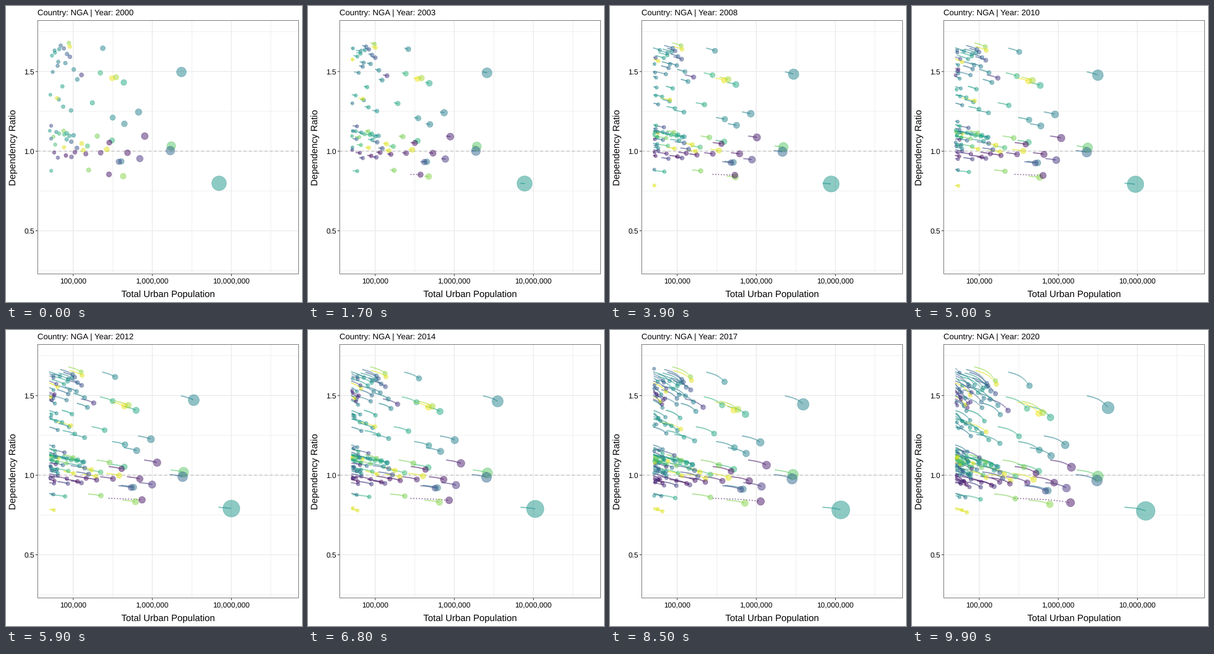
Write a matplotlib script that moves like this. It is 480x480 px and loops after 10000 ms.

```python
import numpy as np
import matplotlib.pyplot as plt
from matplotlib.animation import FuncAnimation

FRAMES, YEARS = 100, 20
SIZE, DPI = 480, 80
PT = 72 / DPI                       # points per pixel
LEFT, RIGHT, TOP, BOTTOM = 51.5, 474.5, 23.5, 434.5
X_100K, DECADE = 109, 128.25        # log axis: position of 100,000, pixels per decade
Y_ONE, UNIT = 235.4, 258.2          # ratio axis: position of 1.0, pixels per unit
X_ENTRY = 70.5                      # 50,000 inhabitants
GROWTH = 33.5                       # usual shift of a city over the whole period

plt.rcParams["font.family"] = ["Liberation Sans", "DejaVu Sans"]
plt.rcParams["text.hinting"] = "none"

# The cities that stand apart: x, y, shade
LEADERS = [
    (345.5, 287.5, .53), (284.5, 107, .45), (215, 172, .43), (225, 211, .08),
    (268, 227, .74), (266.5, 234.5, .33), (191, 124, .6), (157, 68.5, .46),
    (190, 276, .82), (217, 247.5, .15), (187, 252, .4), (183, 252.5, .24),
    (197, 238, .05), (192, 191, .43), (173, 181, .48), (172, 117, .98),
    (178.5, 115.5, .87), (153, 108.5, .66), (172, 218, .65), (167.5, 221.5, .03),
    (163.5, 232.5, .95), (140, 157, .6), (153.5, 238, .07), (134, 266, .8),
    (148, 211, .79), (102, 60, .83),
]
BOOMTOWN = (167, 273, .05)

# Crowd of small cities: y range, largest x, present at start, arriving later, shades
CROWD = [
    (62, 81, 106, 8, 5, .25, .58),
    (82, 120, 126, 8, 16, .1, .5),
    (130, 158, 95, 4, 9, .35, .6),
    (163, 170, 122, 2, 0, .45, .6),
    (186, 200, 90, 1, 6, .2, .85),
    (201, 213, 112, 9, 17, .45, .82),
    (214, 232, 136, 8, 13, .1, .75),
    (233, 248, 138, 7, 9, 0, .2),
    (262, 269, 98, 1, 2, .35, .65),
    (287, 294, 72, 0, 2, .6, .85),
]


def fall(t):
    """Share of the total drop reached t years in: slow first, then steeper."""
    u = t / YEARS
    return .4 * u + .6 * u ** 3.2


def drop(y):
    """Higher ratios fall further over the whole period."""
    return 22.5 - (y - 60) * .073


def spread(rng, lo, hi, n):
    """n jittered, evenly spread values in random order."""
    return lo + (hi - lo) * rng.permutation((np.arange(n) + rng.random(n)) / max(n, 1))


def build_cities():
    """Rows of entry year, x at entry, growth per year, y at entry, shade."""
    rng = np.random.default_rng(12)
    rows = [(0, x, GROWTH / YEARS, y, c) for x, y, c in LEADERS]
    x, y, c = BOOMTOWN
    rows.append((0, x, 90 / YEARS, y, c))
    for y_lo, y_hi, x_max, early, late, c_lo, c_hi in CROWD:
        n = early + late
        entry = np.r_[np.zeros(early), np.ceil(spread(rng, 1, YEARS - 1, late))]
        x = np.r_[spread(rng, X_ENTRY, x_max, early), X_ENTRY + rng.random(late)]
        y = np.r_[spread(rng, y_lo, y_hi, early), spread(rng, y_lo, y_hi, late)]
        rate = np.r_[rng.uniform(1.3, 1.9, early), rng.uniform(.9, 2, late)]
        shade = np.where(rng.random(n) < .1, .95, rng.uniform(c_lo, c_hi, n))
        rows += zip(entry, x, rate, y, shade)
    return np.array(rows, float)


ENTRY, X0, RATE, Y0, SHADE = build_cities().T
COLORS = plt.get_cmap("viridis")(SHADE, alpha=.5)


def year(i):
    return i * YEARS / (FRAMES - 1)


def state(t):
    """Positions of the cities present at time t, and their mask."""
    here = ENTRY <= t + 1e-9
    x = X0 + RATE * (t - ENTRY)
    y = Y0 + drop(Y0) * (fall(t) - fall(ENTRY))
    return np.column_stack([x, y])[here], here


def area(r):
    return (2 * r * PT) ** 2


def radius(x):
    pop = 10 ** (5 + (x - X_100K) / DECADE)
    share = np.clip((pop - 5e4) / (1.31e7 - 5e4), 0, None)
    return 2.5 + 12.8 * np.sqrt(share)


fig = plt.figure(figsize=(SIZE / DPI, SIZE / DPI), dpi=DPI, facecolor="white")
ax = fig.add_axes([0, 0, 1, 1])
ax.set(xlim=(0, SIZE), ylim=(SIZE, 0))
ax.axis("off")


def line(xs, ys, color, width, z=1, **kw):
    ax.plot(xs, ys, color=color, lw=width * PT, zorder=z, snap=False,
            solid_capstyle="butt", dash_capstyle="butt",
            solid_joinstyle="miter", **kw)


def text(x, y, s, size, **kw):
    kw = {"va": "baseline", "ha": "center", **kw}
    return ax.text(x, y, s, fontsize=size * PT, color="black", **kw)


def x_pos(exponent):
    return X_100K + (exponent - 5) * DECADE


def y_pos(ratio):
    return Y_ONE - (ratio - 1) * UNIT


def draw_axes():
    grid = "#ebebeb"
    for e in (5.5, 6.5, 7.5):
        line([x_pos(e)] * 2, [TOP, BOTTOM], grid, .75)
    for r in (.25, .75, 1.25, 1.75):
        line([LEFT, RIGHT], [y_pos(r)] * 2, grid, .75)
    for e in (5, 6, 7):
        x = x_pos(e)
        line([x, x], [TOP, BOTTOM], grid, 1.4)
        line([x, x], [BOTTOM, BOTTOM + 3.5], "#333333", 1)
        text(x - .5, 449, f"{10 ** e:,}", 12)
    for r in (.5, 1, 1.5):
        y = y_pos(r)
        line([LEFT, RIGHT], [y, y], grid, 1.4)
        line([LEFT - 3.5, LEFT], [y, y], "#333333", 1)
        text(46, y + 4.4, f"{r:.1f}", 12, ha="right")
    line([LEFT, RIGHT], [Y_ONE] * 2, "#b8b8b8", 1.07, z=2, linestyle=(0, (4, 4)))
    line([LEFT, RIGHT, RIGHT, LEFT, LEFT], [TOP, TOP, BOTTOM, BOTTOM, TOP],
         "#7c7c7c", 1, z=6)
    text(262.5, 472, "Total Urban Population", 15)
    text(19.5, 229.5, "Dependency Ratio", 15, rotation=90, va="center", ha="right")


draw_axes()
title = text(51, 15, "", 13.3, ha="left")
trail = ax.scatter([], [], s=area(.75), linewidths=.5 * PT, zorder=3)
dots = ax.scatter([], [], linewidths=.7 * PT, zorder=4)

# Each city leaves a mark every fifth step
marks = [(k, *state(year(k))) for k in range(0, FRAMES, 5)]


def paint(coll, points, colors):
    coll.set_offsets(points)
    coll.set_facecolor(colors)
    coll.set_edgecolor(colors)


def draw(i):
    t = year(i)
    title.set_text(f"Country: NGA | Year: {2000 + round(t)}")
    past = [(p, COLORS[here]) for k, p, here in marks if k < i]
    paint(trail, np.vstack([np.empty((0, 2))] + [p for p, _ in past]),
          np.vstack([np.empty((0, 4))] + [c for _, c in past]))
    points, here = state(t)
    paint(dots, points, COLORS[here])
    dots.set_sizes(area(radius(points[:, 0])), fig.dpi)
    return title, trail, dots


anim = FuncAnimation(fig, draw, frames=FRAMES, init_func=lambda: draw(0),
                     interval=100, repeat=True, repeat_delay=0, blit=False)
plt.show()
```
